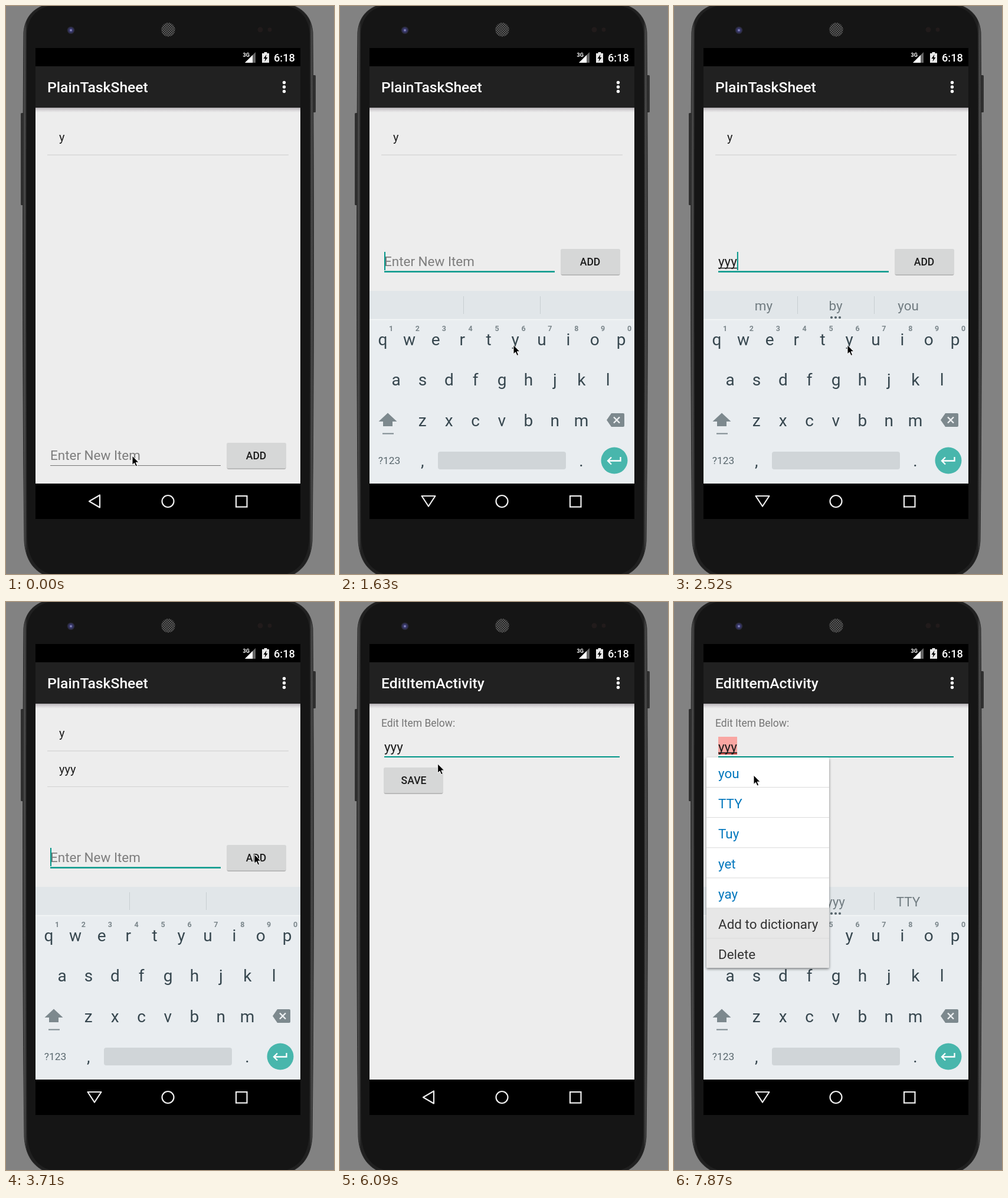
Animation of 556x961 px, one loop 8000 ms. Source, as an HTML page:

```html
<!DOCTYPE html>
<html lang="en">
<head>
<meta charset="utf-8">
<title>To-do list demo</title>
<style>
  html, body { margin: 0; width: 100%; height: 100%; overflow: hidden; background: #828282; }
  svg { display: block; width: 100%; height: 100%; font-family: Roboto, sans-serif; }
  .mid { text-anchor: middle; }
  .title { font-size: 24.7px; font-weight: 500; fill: #fff; }
  .body { font-size: 22.45px; }
  .item { font-size: 20px; fill: #1c1c1c; }
  .button { font-size: 17.5px; font-weight: 500; fill: #1c1c1c; text-anchor: middle; }
  .key { font-size: 28px; fill: #37474f; text-anchor: middle; }
  .digit { font-size: 12.5px; font-weight: 700; fill: #7b868b; text-anchor: middle; }
  .word { font-size: 22.45px; fill: #717c81; text-anchor: middle; }
  #popup { filter: drop-shadow(0 2px 2px #0007); }
</style>
</head>
<body>
<svg viewBox="0 0 556 961" preserveAspectRatio="none">
  <defs>
    <clipPath id="windowClip"><rect x="50" y="102" width="449" height="706"/></clipPath>
    <clipPath id="rowClip"><rect x="70" y="252.5" width="409" height="59.5"/></clipPath>
    <linearGradient id="barShadow" x2="0" y2="1">
      <stop stop-color="#aaa6aa"/><stop offset=".5" stop-color="#d3d0d3"/><stop offset="1" stop-color="#ededed"/>
    </linearGradient>
    <linearGradient id="rim">
      <stop stop-color="#303030"/><stop offset=".006" stop-color="#4b4b4b"/><stop offset=".014" stop-color="#202020"/>
      <stop offset=".986" stop-color="#202020"/><stop offset=".994" stop-color="#4b4b4b"/><stop offset="1" stop-color="#303030"/>
    </linearGradient>
    <radialGradient id="lens">
      <stop stop-color="#aaaadd"/><stop offset=".4" stop-color="#3a3a72"/><stop offset="1" stop-color="#25252e"/>
    </radialGradient>
    <pattern id="mesh" width="4" height="4" patternUnits="userSpaceOnUse">
      <circle cx="1" cy="1" r="1" fill="#6a6a6a"/><circle cx="3" cy="3" r="1" fill="#6a6a6a"/>
    </pattern>
    <g id="appBar">
      <rect x="50" y="102" width="449" height="706" fill="#ededed"/>
      <rect x="50" y="171" width="449" height="9" fill="url(#barShadow)"/>
      <rect x="50" y="102" width="449" height="70" fill="#212121"/>
      <g fill="#fff"><circle cx="471.5" cy="129.5" r="2.7"/><circle cx="471.5" cy="137" r="2.7"/><circle cx="471.5" cy="144.5" r="2.7"/></g>
    </g>
    <g id="buttonFace">
      <rect x=".5" y="1.5" width="100" height="43.5" rx="3" fill="#b9b9b9"/>
      <rect width="101" height="43" rx="2.5" fill="#d6d7d7"/>
    </g>
  </defs>

  <!-- Phone -->
  <rect width="556" height="961" fill="#828282"/>
  <rect x="25" y="181" width="8" height="156" rx="1.5" fill="#303030"/>
  <rect x="518" y="117" width="7" height="63" rx="1.5" fill="#303030"/>
  <path fill="url(#rim)" stroke="#292929" d="M30 45C32 20 45 4 70-3H480C505 4 518 20 520 45C522 300 522 650 519 905C517 935 505 955 480 965H70C45 955 33 935 31 905C28 650 28 300 30 45Z"/>
  <path fill="#151515" d="M35 47C37 22 48 7 72 0H478C502 7 513 22 515 47C516 300 516 650 514 903C512 933 500 953 476 961H74C50 953 38 933 36 903C34 650 34 300 35 47Z"/>
  <circle cx="110" cy="41" r="6.3" fill="url(#lens)"/>
  <circle cx="275" cy="40" r="11.7" fill="#242424"/><circle cx="275" cy="40" r="11.7" fill="url(#mesh)"/>
  <g fill="#211b1b"><circle cx="431" cy="40" r="4.5"/><circle cx="447" cy="40" r="3.5"/></g>

  <!-- Status bar -->
  <rect x="50" y="71" width="449" height="31"/>
  <path d="M423 78V96H405Z" fill="#666"/><path d="M418 83V96H405Z" fill="#fff"/>
  <text x="401.5" y="86" font-size="9" font-weight="700" fill="#fff">3G</text>
  <path d="M437.5 78H442.5V80H446V96H434V80H437.5Z" fill="#e8e8e8"/>
  <path d="M441.5 82L436.5 89H439.5L438.5 94L443.5 87H440.5Z"/>
  <text x="454" y="94" font-size="18.2" font-weight="500" fill="#fff">6:18</text>

  <g clip-path="url(#windowClip)">
    <!-- List screen -->
    <use href="#appBar"/>
    <text class="title" x="70" y="146">PlainTaskSheet</text>
    <circle id="ripple" cy="282" fill="#dfdfdf" clip-path="url(#rowClip)"/>
    <text class="item" x="90" y="229">y</text>
    <path d="M70 252H479" stroke="#d8d8d8" stroke-width="1.3"/>
    <g id="newItem">
      <text class="item" x="90" y="290">yyy</text>
      <path d="M70 312.5H479" stroke="#d2d2d2"/>
    </g>
    <g id="entry">
      <text id="input" class="body" x="75" y="768"></text>
      <path id="composing" stroke="#222" stroke-width="1.6"/>
      <path id="underline" d="M75 777.5H364"/>
      <rect id="caret" y="744" width="2" height="31" fill="#009688"/>
      <use href="#buttonFace" x="374" y="739"/>
      <text class="button" x="424" y="767">ADD</text>
    </g>

    <!-- Edit screen -->
    <g id="edit">
      <use href="#appBar"/>
      <text class="title" x="70" y="146">EditItemActivity</text>
      <text x="70" y="210.5" font-size="17.5" fill="#757575">Edit Item Below:</text>
      <g id="selection">
        <rect x="75" y="228" width="32" height="30" fill="#f9a6a2"/>
        <path d="M75 257H107" stroke="#d5453f" stroke-width="2"/>
        <path d="M75 255H107" stroke="#222" stroke-width="1.6"/>
      </g>
      <text class="body" x="75" y="252.5" fill="#1c1c1c">yyy</text>
      <path d="M75 262H474" stroke="#009688" stroke-width="2"/>
      <use href="#buttonFace" x="74" y="280"/>
      <text class="button" x="125" y="308">SAVE</text>
    </g>

    <!-- Keyboard -->
    <g id="keyboard">
      <rect x="50" y="482" width="449" height="326" fill="#e9edf0"/>
      <rect x="50" y="482" width="449" height="48" fill="#e1e6e9"/>
      <path d="M50 530.5H499" stroke="#f4f6f7" stroke-width="1.5"/>
      <path d="M209.5 491V521M339.5 491V521" stroke="#c8ced1"/>
      <text class="word" x="152" y="515"></text>
      <text class="word" x="274" y="515"></text>
      <text class="word" x="397" y="515"></text>
      <g id="more" fill="#56646b"><circle cx="267" cy="527" r="2.1"/><circle cx="274" cy="527" r="2.1"/><circle cx="281" cy="527" r="2.1"/></g>
      <g id="keys"></g>
      <path d="M81 688.5L96.5 703H89V711H73V703H65.5Z" fill="#7d898e"/>
      <path d="M72 723.5H91" stroke="#7d898e" stroke-width="2"/>
      <path d="M460 689H480Q482 689 482 691V710Q482 712 480 712H460L452 700.5Z" fill="#7d898e"/>
      <path d="M464 695.5L474 705.5M474 695.5L464 705.5" stroke="#eef1f3" stroke-width="2.4"/>
      <text class="mid" x="83.5" y="775" font-size="17.4" fill="#5a686e">?123</text>
      <rect x="166" y="754" width="217" height="30" rx="4" fill="#d0d5d8"/>
      <circle cx="465" cy="769" r="22.5" fill="#48b6ac"/>
      <path d="M475.5 763V769.5H455M460 763.5L454 769.5L460 775.5" fill="none" stroke="#fff" stroke-width="2.3"/>
    </g>
  </g>

  <!-- Navigation bar -->
  <rect x="50" y="808" width="449" height="60"/>
  <g fill="none" stroke="#eee" stroke-width="2.2">
    <path id="back" stroke-linejoin="round"/>
    <circle cx="274.5" cy="838" r="10"/>
    <rect x="390" y="829" width="18.5" height="18.5"/>
  </g>

  <g id="popup">
    <rect x="55" y="263" width="208" height="356" rx="2" fill="#fff"/>
    <path d="M55 518H263V617Q263 619 261 619H57Q55 619 55 617Z" fill="#e7e7e7"/>
  </g>
  <path id="pointer" d="M0 0V15.5L3.5 12.2L6 18L8.6 16.9L6.2 11.2H11Z" stroke="#fff" stroke-width="1" stroke-linejoin="round"/>
</svg>

<script>
const LOOP = 8000, TICK = 148.5;   // the screen refreshes once per tick
const $ = id => document.getElementById(id);
const show = (id, on) => $(id).style.display = on ? '' : 'none';
const set = (id, attrs) => Object.entries(attrs).forEach(([k, v]) => $(id).setAttribute(k, v));
const text = (cls, x, y, s) => `<text class="${cls}" x="${x}" y="${y}">${s}</text>`;

const keyRow = (chars, x, y, cls = 'key') => [...chars].map((c, i) => text(cls, x + i * 44.9, y, c)).join('');
$('keys').innerHTML = keyRow('qwertyuiop', 72.5, 574) + keyRow('1234567890', 86.5, 550, 'digit') +
  keyRow('asdfghjkl', 95, 642) + keyRow('zxcvbnm', 139.7, 711) +
  text('key', 139.7, 779, ',') + text('key', 409, 779, '.');

['you', 'TTY', 'Tuy', 'yet', 'yay', 'Add to dictionary', 'Delete'].forEach((s, i) => {
  const y = i * 51.1;
  const line = i < 6 ? `<path d="M55 ${313.5 + y}H263" stroke="#dadada"/>` : '';
  $('popup').innerHTML += `<g fill="${i < 5 ? '#0277bd' : '#333'}">${text('body', 75, 297.5 + y, s)}${line}</g>`;
});

// Tracks hold [tick, ...values]
const pointerTrack = [[2, 214, 761], [8, 290, 578], [11, 294, 573.5], [17, 294, 573.5], [20, 421, 427],
  [25, 421, 427], [29, 166, 304], [32, 166, 304], [36, 166, 289], [40, 166, 289], [43, 165, 243.5],
  [51, 165, 243.5], [53, 135, 293]];
const keyboardTrack = [[1, 0], [3, 1], [39, 1], [41, 0], [44, 0], [47, 1]];
const editTrack = [[39, 0], [41, 1]];
const caretFlips = [1, 5, 8, 23, 25, 29, 33, 36, 38];
const typed = [[0, ''], [13, 'y'], [15, 'yy'], [17, 'yyy'], [22, '']];
const suggestions = [[0, ''], [13, 'you y yeah'], [15, 'my yy you'], [17, 'my by you'], [22, ''], [45, 'you yyy TTY']];

function lerpTrack(track, n) {
  const i = track.findIndex(k => k[0] > n);
  if (i < 0) return track.at(-1).slice(1);
  if (i === 0) return track[0].slice(1);
  const [t0, ...a] = track[i - 1], [t1, ...b] = track[i];
  return a.map((v, j) => v + (b[j] - v) * (n - t0) / (t1 - t0));
}
const latest = (track, n) => track.filter(k => k[0] <= n).at(-1)[1];

function draw(n) {
  const focused = n >= 1, entered = latest(typed, n);
  set('entry', { transform: `translate(0 ${n >= 2 ? -328 : 0})` });
  $('input').textContent = entered || 'Enter New Item';
  set('input', { fill: entered ? '#1c1c1c' : '#7d7d7d' });
  const end = entered ? 75 + $('input').getComputedTextLength() : 75;
  set('composing', { d: `M75 771.5H${end}` });
  show('composing', entered);
  set('underline', { stroke: focused ? '#009688' : '#777', 'stroke-width': focused ? 2.6 : 1 });
  set('caret', { x: end });
  show('caret', caretFlips.filter(f => f <= n).length % 2);

  show('newItem', n >= 22);
  show('ripple', n >= 38);
  set('ripple', { cx: n > 38 ? 274 : 259.5, r: n > 38 ? 215 : 178.5 });

  const [opened] = lerpTrack(editTrack, n);
  set('edit', { opacity: opened, transform: `translate(0 ${(1 - opened) * 56})` });
  show('selection', n >= 45);
  show('popup', n >= 48);

  const [raised] = lerpTrack(keyboardTrack, n);
  set('keyboard', { opacity: raised, transform: `translate(0 ${(1 - raised) * 33})` });
  set('back', { d: raised > 0 ? 'M138.5 829H161.5L150 846.5Z' : 'M141 838L159 827.5V848.5Z' });
  const words = latest(suggestions, n).split(' ');
  document.querySelectorAll('.word').forEach((el, i) => el.textContent = words[i] || '');
  show('more', words[0]);

  set('pointer', { transform: `translate(${lerpTrack(pointerTrack, n)})` });
}

function loop() {
  draw(Math.floor((performance.now() % LOOP + 12) / TICK));
  requestAnimationFrame(loop);
}
loop();
</script>
</body>
</html>
```
